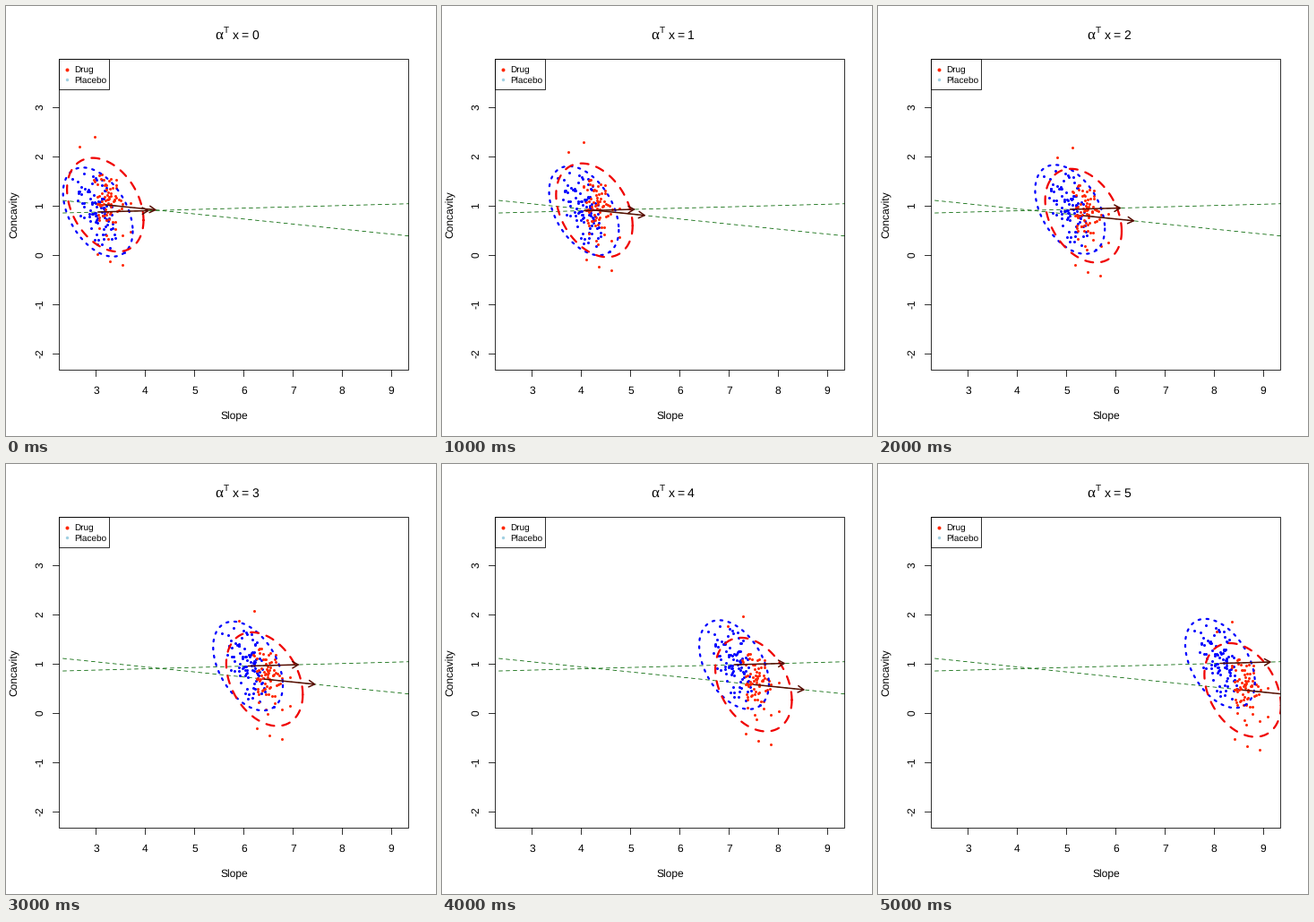
Write a matplotlib script that moves like this. It is 480 by 480 pixels and loops after 6000 ms.

```python
import numpy as np
import matplotlib.pyplot as plt
from matplotlib.animation import FuncAnimation
from matplotlib.patches import Rectangle

SIZE, DPI = 480, 96
PX = 72 / DPI  # points per pixel
LEFT, TOP, RIGHT, BOTTOM = 59, 59, 449, 406
UNIT = 54.95   # pixels per axis unit
THIN = 0.8
RED, BLUE, GREEN, BROWN = "#ff2600", "#0000ff", "#006400", "#560c00"

plt.rcParams["font.family"] = "Liberation Sans"
plt.rcParams["text.hinting"] = "no_hinting"
plt.rcParams["text.hinting_factor"] = 1
fig = plt.figure(figsize=(SIZE / DPI, SIZE / DPI), dpi=DPI, facecolor="white")
ax = fig.add_axes([0, 0, 1, 1])
ax.set_xlim(0, SIZE)
ax.set_ylim(SIZE, 0)
ax.axis("off")


def box(width, height, z, **kw):
    return ax.add_patch(Rectangle((LEFT, TOP), width, height, ec="black",
                                  lw=THIN * PX, zorder=z, **kw))


frame = box(RIGHT - LEFT, BOTTOM - TOP, 9, fill=False)


def line(x, y, color="black", width=THIN, clip=False, **kw):
    art, = ax.plot(x, y, color=color, lw=width * PX, **kw)
    if clip:
        art.set_clip_path(frame)
    return art


def dots(x, y, color, size, z):
    return line(x, y, color, ls="", marker="o", ms=size * PX, mew=0,
                zorder=z, snap=False)


def label(x, y, text, size=12, ha="center", **kw):
    return ax.text(x, y, text, fontsize=size * PX, ha=ha, va="baseline",
                   rotation_mode="anchor", zorder=10, **kw)


def cloud(seed, count, mean, sd, rho, outliers):
    """Correlated scatter around a group centre, plus a few outliers."""
    rng = np.random.default_rng(seed)
    u, v = rng.normal(size=(2, 4 * count))
    keep = np.hypot(u, v) < 2.1
    u, v = u[keep][:count], v[keep][:count]
    x = mean[0] + sd[0] * u
    y = mean[1] + sd[1] * (rho * u + np.sqrt(1 - rho ** 2) * v)
    return np.vstack([np.column_stack([x, y]), outliers])


class Group:
    def __init__(self, start, step, arrow, half, rho, points, color,
                 ring_color, dash, z):
        self.start, self.step = np.array(start), np.array(step)
        t = np.linspace(0, 2 * np.pi, 200)
        ring = np.column_stack([half[0] * np.cos(t),
                                half[1] * np.cos(t - np.arccos(rho))])
        tip = np.array(arrow)
        angle = np.arctan2(tip[1], tip[0])
        barbs = [tip - 7.4 * np.array([np.cos(angle + s), np.sin(angle + s)])
                 for s in (-np.pi / 6, np.pi / 6)]
        head = np.array([barbs[0], tip, barbs[1]])
        shaft = np.array([(0, 0), tip])

        # trend line through the group's path
        slope = step[1] / step[0]
        ends = np.array([63.5, 449.5])
        line(ends, start[1] + slope * (ends - start[0]), GREEN,
             ls=(0, (4 / THIN, 4 / THIN)), dash_capstyle="round", zorder=1)

        self.parts = [
            (points, dots([], [], color, 3, z)),
            (ring, line([], [], ring_color, 2.25, True, ls=(0, dash),
                        dash_capstyle="round", zorder=z + 2)),
        ]
        for shape in (shaft, head):
            self.parts.append((shape, line([], [], BROWN, 1.5, True,
                                           solid_capstyle="round",
                                           solid_joinstyle="round", zorder=7)))

    def move(self, k):
        centre = self.start + k * self.step
        for shape, art in self.parts:
            art.set_data(*(shape + centre).T)


placebo = Group((102.6, 230), (55.85, -1.49), (56, -1.5), (38.9, 49.7), 0.43,
                cloud(11, 92, (0, -3), (12, 24), 0.42, [(-29, -37), (29, 45)]),
                BLUE, BLUE, (1, 3), 2)
drug = Group((110.8, 221.9), (59.25, 6.08), (56, 5.7), (42.7, 52.3), 0.33,
             cloud(5, 72, (4, -1), (9.5, 21), 0.35,
                   [(-12, -76), (-29, -65), (-9, 55), (5, 63), (19, 67),
                    (28, 30), (28, -2)]),
             RED, "#f00000", (4, 4), 3)

# axes
for v in range(3, 10):
    x = 100 + UNIT * (v - 3)
    line([x, x], [BOTTOM, BOTTOM + 7])
    label(x + 0.5, 433, str(v))
for v in range(-2, 4):
    y = 277.8 - UNIT * v
    line([LEFT - 7, LEFT], [y, y])
    label(41.5, y, str(v), rotation=90)
label(254.4, 462, "Slope")
label(12.6, 232.5, "Concavity", rotation=90)

# legend
box(56, 34, 8, fc="white")
for y, name, color, size in ((70.5, "Drug", RED, 4),
                             (82.3, "Placebo", "#9fd0e2", 3.4)):
    dots([67.8], [y], color, size, 9)
    label(76, y + 3.5, name, 9.6, "left")

# title
label(233.5, 37, "α", 17, "left", family="Liberation Serif")
label(243, 30, "T", 10.2, "left")
label(252.8, 37, "x", 14.4, "left")
label(262.6, 37, "=", 14.4, "left")
digit = label(274, 37, "0", 14.4, "left")


def update(k):
    drug.move(k)
    placebo.move(k)
    digit.set_text(str(k))


anim = FuncAnimation(fig, update, frames=6, interval=1000, repeat=True,
                     repeat_delay=0, init_func=lambda: update(0))
plt.show()
```
